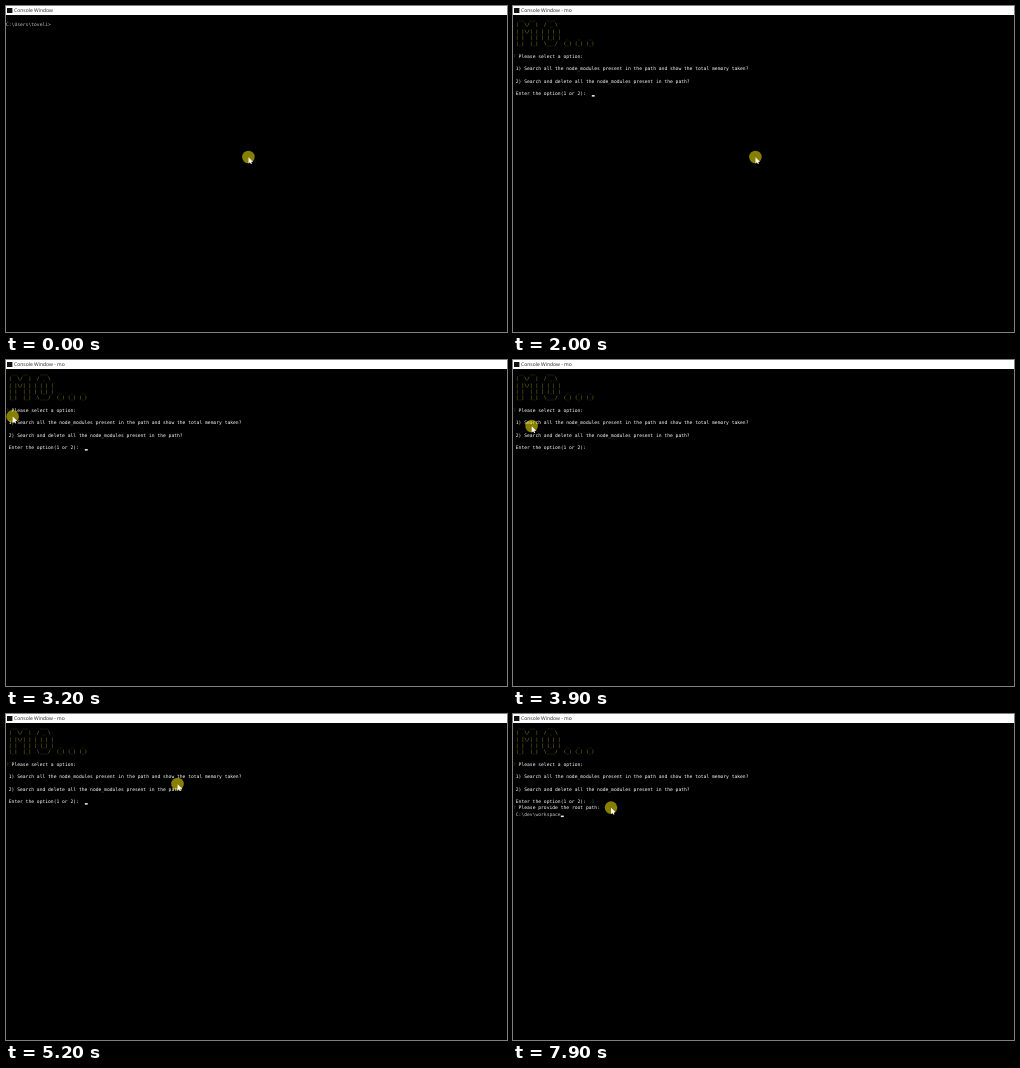
An HTML page that plays this animation: 501 by 326 pixels, repeating every 8000 ms.

```html
<!DOCTYPE html>
<html lang="en">
<head>
<meta charset="utf-8">
<title>Console</title>
<style>
  html, body { margin: 0; width: 100%; height: 100%; overflow: hidden; background: #000; }
  svg { display: block; width: 100%; height: 100%; }
  text { white-space: pre; text-rendering: geometricPrecision; }
  #screen { font: 4.676px "DejaVu Sans Mono", "Liberation Mono", monospace; }
  #title { font: 5px "Open Sans", "Noto Sans", sans-serif; fill: #222; }
</style>
</head>
<body>
<svg viewBox="0 0 501 326" xmlns="http://www.w3.org/2000/svg">
  <rect width="501" height="326"/>
  <rect width="501" height="9" fill="#fff"/>
  <rect x="1" y="2" width="5.4" height="5" fill="#111"/>
  <text id="title" x="8" y="6.3"></text>
  <g id="screen"></g>
  <rect id="caret" width="2.9" height="1.5" fill="#f2f2f2"/>
  <g id="mouse">
    <circle r="6.3" fill="#fff000" fill-opacity=".53"/>
    <path d="M.1 .2V6.4L1.5 5.1L2.5 7.1L3.5 6.7L2.6 4.7H4.5Z" fill="#fff"/>
  </g>
</svg>
<script>
const LOOP = 8000, STEP = 100, BLINK = 525, COL = 2.815, ROW = 6.25;
const byId = id => document.getElementById(id);
const baseline = row => 14.2 + ROW * row;

const menu = String.raw`  __  __    ___
 |  \/  |  / _ \
 | |\/| | | | | |
 | |  | | | |_| |  _   _   _
 |_|  |_|  \___/  (_) (_) (_)

? Please select a option:

 1) Search all the node_modules present in the path and show the total memory taken?

 2) Search and delete all the node_modules present in the path?

 Enter the option(1 or 2):  `;

// Each entry holds the whole screen; the caret sits at its end and blinks after a wait.
const script = [];
let written = "";
function write(at, text, wait = 0) {
  written += text;
  script.push({ at, wait, lines: written.split("\n") });
}
write(0, "\nC:\\Users\\toveli>", 300);
write(700, "m");
write(900, "o");
write(1300, "\n");
written = "";
write(2000, menu);
write(6100, "1", 600);
write(7000, "\n? Please provide the root path:\n ");
write(7800, "C:\\dev\\workspace");

// start, duration, target x, target y
const moves = [
  [2000, 700, 10, 52],
  [2900, 300, 6.6, 56.4],
  [3200, 700, 18.6, 66],
  [3900, 800, 88.5, 70],
  [4700, 500, 171.5, 70],
  [5300, 400, 98, 93.6]
];

const ease = k => k * k * (3 - 2 * k);
const mouseAt = t => moves.reduce(([x, y], [start, span, toX, toY]) => {
  const k = ease(Math.min(1, Math.max(0, (t - start) / span)));
  return [x + (toX - x) * k, y + (toY - y) * k];
}, [242.4, 151]);

function colour(part, answered) {
  if (part === "?") return "#1a6a1a";
  if (part === "1") return answered ? "#0f6068" : "#c4c4c4";
  if (part.startsWith("C:")) return "#c4c4c4";
  return /^[\s|_\/\\()]+$/.test(part) ? "#949010" : "#fff";
}

function add(parent, tag, attrs) {
  const el = document.createElementNS("http://www.w3.org/2000/svg", tag);
  for (const name in attrs) el.setAttribute(name, attrs[name]);
  return parent.appendChild(el);
}

function paint({ at, lines }) {
  byId("screen").replaceChildren();
  lines.forEach((line, row) => {
    const text = add(byId("screen"), "text", { x: 0, y: baseline(row) });
    for (const part of line.split(/(^\?|C:\\.*|1$)/)) {
      if (part) add(text, "tspan", { fill: colour(part, at >= 7000) }).textContent = part;
    }
  });
}

let shown;
function draw(now) {
  const t = Math.floor((now % LOOP) / STEP) * STEP;
  const scene = script.filter(s => s.at <= t).pop();
  if (scene !== shown) paint(shown = scene);

  const row = scene.lines.length - 1;
  const phase = t - scene.at - scene.wait;
  const caret = byId("caret");
  caret.setAttribute("x", scene.lines[row].length * COL);
  caret.setAttribute("y", baseline(row) - 0.1);
  caret.style.display = phase >= 0 && Math.floor(phase / BLINK) % 2 === 0 ? "" : "none";

  byId("title").textContent = "Console Window" + (t >= 1300 ? " - mo" : "");
  byId("mouse").setAttribute("transform", `translate(${mouseAt(t)})`);
}

function tick() {
  draw(performance.now());
  requestAnimationFrame(tick);
}
tick();
</script>
</body>
</html>
```
